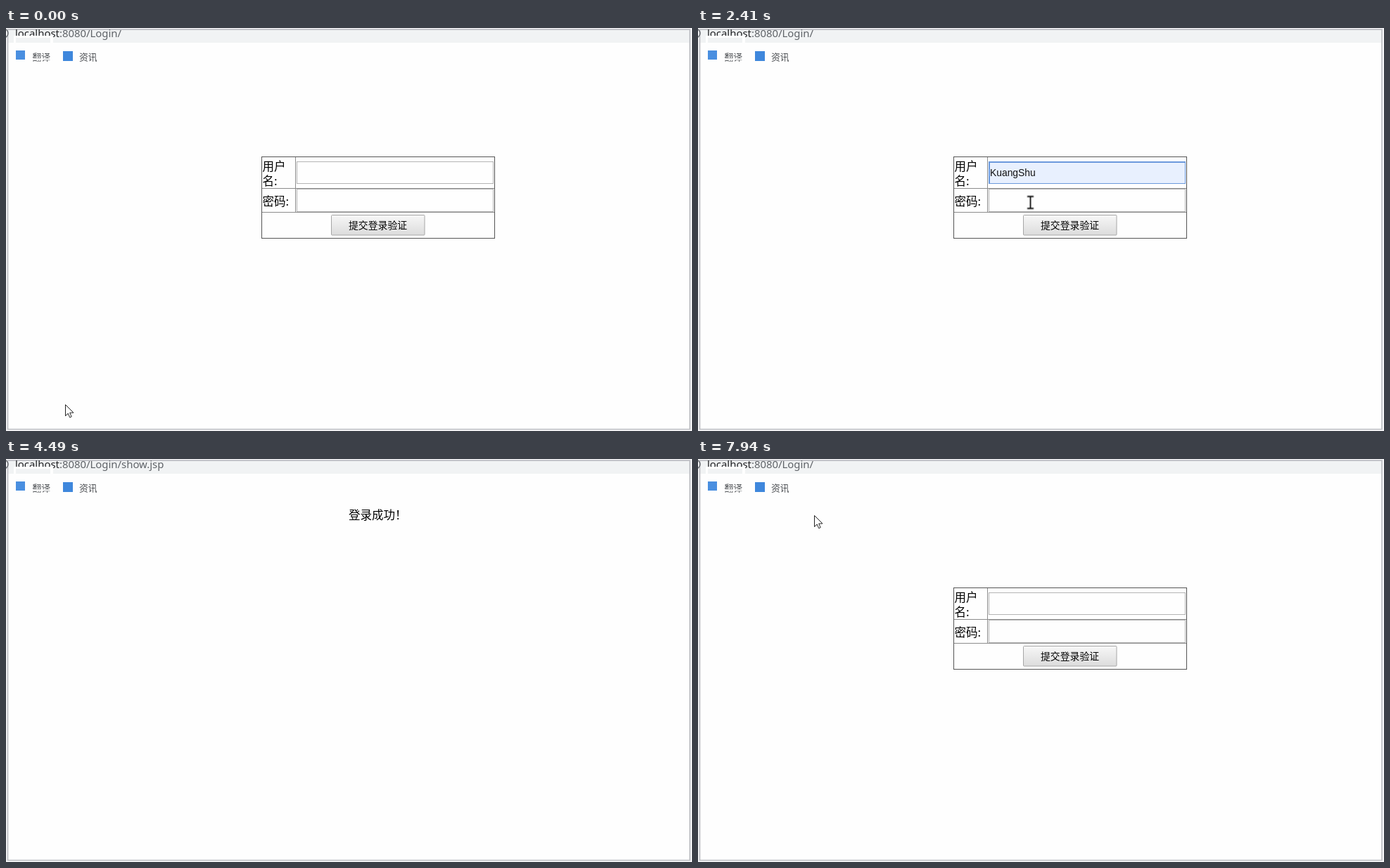
An HTML page that plays this animation: 975 by 574 pixels, repeating every 8 s.

```html
<!DOCTYPE html>
<html lang="zh">
<head>
<meta charset="utf-8">
<title>Login</title>
<style>
html, body { margin: 0; width: 100%; height: 100%; overflow: hidden; background: #f5f5f7; }
svg { display: block; }
text { font-family: "Noto Sans", "Noto Sans CJK SC", sans-serif; white-space: pre; }
.cjk { font: 16.5px "Noto Sans CJK SC", sans-serif; }
.mark { font-size: 12.8px; fill: #4a4d51; }
.submit { font-size: 13.85px; }
.value { font: 13.87px "Liberation Sans", Arial, sans-serif; fill: #111; }
.list text { font-size: 13.8px; fill: #202124; }
.list .panel { fill: #fff; filter: drop-shadow(0 1px 1.5px rgba(0, 0, 0, .38)); }

/* Every layer shares one 8 s clock and switches hard */
.t { animation: 8s step-end infinite; }
.form { animation-name: form; }
.done { animation-name: done; }
.jsp { animation-name: jsp; }
.user-focus { animation-name: user-focus; }
.user-value { animation-name: user-value; }
.user-list { animation-name: user-list; }
.user-hover { animation-name: user-hover; }
.pass-focus { animation-name: pass-focus; }
.pass-value { animation-name: pass-value; }
.pass-list { animation-name: pass-list; }
.pass-hover { animation-name: pass-hover; }
.arrow { animation-name: arrow; }
.beam { animation-name: beam; }
.pointer { animation-name: pointer; }

@keyframes form { 0% { opacity: 1 } 47.9% { opacity: 0 } 76.2% { opacity: 1 } }
@keyframes done { 0% { opacity: 0 } 47.9% { opacity: 1 } 76.2% { opacity: 0 } }
@keyframes jsp { 0% { fill-opacity: 0 } 47.9% { fill-opacity: 1 } 75.1% { fill-opacity: 0 } }
@keyframes user-focus { 0% { opacity: 0 } 12.6% { opacity: 1 } 33% { opacity: 0 } }
@keyframes user-value { 0% { opacity: 0 } 21.2% { opacity: 1 } 47.9% { opacity: 0 } }
@keyframes user-list { 0% { opacity: 0 } 13.6% { opacity: 1 } 26.1% { opacity: 0 } }
@keyframes user-hover { 0% { opacity: 0 } 21.2% { opacity: 1 } 26.1% { opacity: 0 } }
@keyframes pass-focus { 0% { opacity: 0 } 33% { opacity: 1 } 46.85% { opacity: 0 } }
@keyframes pass-value { 0% { opacity: 0 } 38.9% { opacity: 1 } 47.9% { opacity: 0 } }
@keyframes pass-list { 0% { opacity: 0 } 34% { opacity: 1 } 40.85% { opacity: 0 } }
@keyframes pass-hover { 0% { opacity: 0 } 38.9% { opacity: 1 } 40.85% { opacity: 0 } }

@keyframes beam {
  0% { opacity: 0 } 4.6% { opacity: 1 } 20.2% { opacity: 0 }
  26.1% { opacity: 1 } 37.85% { opacity: 0 }
  78.1% { opacity: 1 } 82.85% { opacity: 0 }
}
@keyframes arrow {
  0% { opacity: 1 } 4.6% { opacity: 0 } 20.2% { opacity: 1 }
  26.1% { opacity: 0 } 37.85% { opacity: 1 } 56.1% { opacity: 0 }
  82.85% { opacity: 1 } 89.45% { opacity: 0 } 97.45% { opacity: 1 }
}
@keyframes pointer {
  0% { transform: translate(84px, 536px) }
  .85% { transform: translate(84px, 536px); animation-timing-function: steps(5, start) }
  5.55% { transform: translate(420px, 193px); animation-timing-function: steps(2, start) }
  7.45% { transform: translate(467px, 209px) }
  8.6% { transform: translate(467px, 209px); animation-timing-function: steps(2, start) }
  10.35% { transform: translate(472px, 209px) }
  19.2% { transform: translate(472px, 209px); animation-timing-function: steps(5, start) }
  24.2% { transform: translate(475px, 250px) }
  30.1% { transform: translate(475px, 250px); animation-timing-function: steps(2, start) }
  32.1% { transform: translate(470px, 247px) }
  37.85% { transform: translate(470px, 247px); animation-timing-function: steps(3, start) }
  41% { transform: translate(469px, 291px) }
  41.85% { transform: translate(469px, 291px); animation-timing-function: steps(3, start) }
  44.6% { transform: translate(490px, 296px) }
  45.85% { transform: translate(490px, 296px); animation-timing-function: steps(2, start) }
  47.85% { transform: translate(530px, 280px) }
  48.95% { transform: translate(530px, 280px); animation-timing-function: steps(7, start) }
  55.7% { transform: translate(18px, 102px) }
  78.1% { transform: translate(525px, 243px) }
  79.05% { transform: translate(496px, 243px) }
  80% { transform: translate(496px, 243px); animation-timing-function: steps(9, start) }
  88.55% { transform: translate(128px, 90px) }
  88.6% { transform: translate(17px, 32px) }
  97.45% { transform: translate(2px, 7px) }
  98.35% { transform: translate(84px, 45px) }
  99.2%, 100% { transform: translate(165px, 80px) }
}
</style>
</head>
<body>
<svg width="975" height="574" viewBox="0 0 975 574">
  <defs>
    <linearGradient id="face" x2="0" y2="1">
      <stop stop-color="#f7f7f7"/>
      <stop offset="1" stop-color="#dcdcdc"/>
    </linearGradient>
    <g id="filled" shape-rendering="crispEdges">
      <path d="M413 190H693V222H413z" fill="#e8f0fe"/>
      <path d="M413 221.5H692.5V190" fill="none" stroke="#dcdcdc"/>
      <path d="M414 222V191H693" fill="none" stroke="#8f8f92" stroke-width="2"/>
    </g>
    <g id="ring" fill="none" stroke="#6b99dc" shape-rendering="crispEdges">
      <path d="M414 222V191H693" stroke-width="2"/>
      <path d="M413 221.5H692.5V190"/>
    </g>
    <path id="panel" d="M413 221H693V346.5Q693 350.5 689 350.5H417Q413 350.5 413 346.5z"/>
    <path id="row" d="M413 229.5H693V266.5H413z" fill="#dadce0"/>
  </defs>

  <!-- Browser window -->
  <path d="M2 2H972V571.5H2z" fill="#fefefe"/>
  <path d="M2 2H972V21H2z" fill="#f1f3f4"/>
  <path d="M2.5 2.2H972V571.5H2.5z" fill="none" stroke="#bdbec3" stroke-width="1.7"/>
  <circle cx="-3.5" cy="7.5" r="6.5" fill="none" stroke="#5f6368" stroke-width="1.4"/>
  <text x="13" y="12.5" font-size="14.9" fill="#5f6368"><tspan fill="#202124">localhost</tspan>:8080/Login/<tspan class="t jsp">show.jsp</tspan></text>
  <path d="M11 11H67V22H63V14H14V22H11z" fill="#fefefe"/>

  <rect x="14" y="32" width="13" height="13" fill="#4a8fe0"/>
  <rect x="81" y="33" width="14" height="14" fill="#3f87dc"/>
  <text class="cjk mark" x="37.5" y="46">翻译</text>
  <text class="cjk mark" x="104" y="46">资讯</text>
  <path d="M33 43.2H67V45.6H33z" fill="#fefefe"/>

  <text class="cjk t done" x="487" y="85.5">登录成功！</text>

  <!-- Login form -->
  <g class="t form">
    <g fill="none" shape-rendering="crispEdges">
      <path d="M411.5 184V262M363 228.5H694M363 262.5H694" stroke="#8c8c8c"/>
      <path d="M363.5 183.5H694.5V299.5H363.5z" stroke="#555"/>
      <path d="M413.5 190.5H692.5V221.5H413.5z" stroke="#b4b4b4"/>
      <path d="M413.5 229.5H692.5V261.5H413.5z" stroke="#b4b4b4"/>
    </g>
    <text class="cjk" x="364.5" y="203">用户</text>
    <text class="cjk" x="364.5" y="224">名:</text>
    <text class="cjk" x="364.5" y="253">密码:</text>
    <rect x="462.5" y="266.5" width="132.5" height="28.5" rx="1" fill="url(#face)" stroke="#a6a6a6"/>
    <text class="cjk submit" x="487" y="286">提交登录验证</text>

    <g class="t user-value">
      <use href="#filled"/>
      <text class="value" x="415" y="211">KuangShu</text>
    </g>
    <use class="t user-focus" href="#ring"/>
    <g class="t pass-value">
      <use href="#filled" y="39"/>
      <text class="value" x="415" y="250">Kuang123456</text>
    </g>
    <use class="t pass-focus" href="#ring" y="39"/>

    <g class="list t user-list">
      <path d="M415.5 197V214" stroke="#222"/>
      <use class="panel" href="#panel"/>
      <use class="t user-hover" href="#row"/>
      <text x="425" y="252">KuangShu</text>
      <text x="425" y="290">青砚青砚</text>
      <text x="425" y="327">Gmty40785</text>
    </g>
    <g class="list t pass-list" transform="translate(0 39)">
      <use class="panel" href="#panel"/>
      <use class="t pass-hover" href="#row"/>
      <text x="425" y="252">Kuang123456</text>
      <text x="425" y="290">青砚青砚为</text>
      <text x="425" y="327">A214drfwe</text>
    </g>
  </g>

  <!-- Mouse pointer -->
  <g class="t pointer">
    <path class="t arrow" d="M.5 .5V16.5L4.2 13L6.7 18.7L9.2 17.6L6.7 12H12z" fill="#fff" stroke="#222"/>
    <path class="t beam" d="M-4.5-8.5H4.5M-4.5 8.5H4.5M0-8.5V8.5" fill="none" stroke="#111" stroke-width="1.8"/>
  </g>
</svg>
</body>
</html>
```
